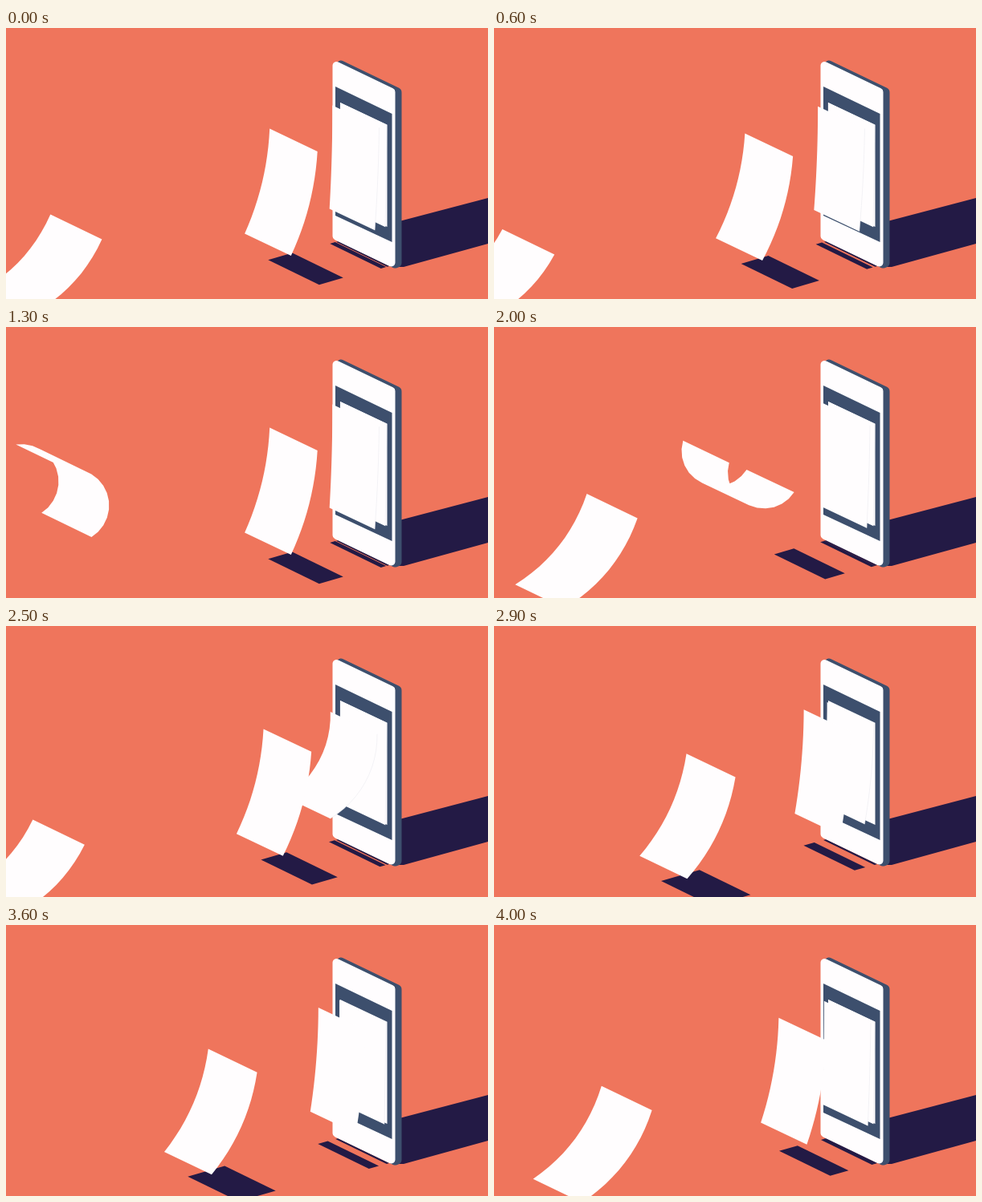
Write an HTML page with a canvas that moves like this. It is 600x338 px and loops after 4100 ms.

```html
<!DOCTYPE html>
<html lang="en">
<head>
<meta charset="utf-8">
<title>Sheets flying into a phone</title>
<style>
  html, body { margin: 0; width: 100%; height: 100%; overflow: hidden; background: #ef755c; }
  canvas { display: block; width: 600px; height: 338px; }
</style>
</head>
<body>
<canvas id="stage" width="600" height="338"></canvas>
<script>
const ctx = document.getElementById('stage').getContext('2d');
const LOOP = 4100, STEP = 100, SEGMENTS = 12;
const ORANGE = '#ef755c', NAVY = '#231a45', SLATE = '#3d4f6d', WHITE = '#fffdfe';

// One sheet tumbles: its top corner (relative to the flight path),
// the heading of its profile there and the total curl, in degrees.
const TUMBLER = 3, SHEET_LENGTH = 126;
const POSES = [
  { p: 0.7, x: 0, y: 0, heading: 90, curl: 0 },
  { p: 1.41, x: -1, y: 10, heading: 88, curl: 60 },
  { p: 2.21, x: -34, y: 60, heading: 122, curl: 165 },
  { p: 3.36, x: -43, y: -86, heading: -8, curl: 155 }
];

const clamp = (x, lo, hi) => Math.min(Math.max(x, lo), hi);
const steps = n => Array.from({ length: n }, (_, i) => i);

function polygon(points, color) {
  ctx.beginPath();
  points.forEach(p => ctx.lineTo(p[0], p[1]));
  ctx.closePath();
  ctx.fillStyle = color;
  ctx.fill();
}

function roundedPolygon(points, radius, color) {
  const n = points.length, first = points[0], last = points[n - 1];
  ctx.beginPath();
  ctx.moveTo((first[0] + last[0]) / 2, (first[1] + last[1]) / 2);
  points.forEach((p, i) => {
    const next = points[(i + 1) % n];
    ctx.arcTo(p[0], p[1], next[0], next[1], radius);
  });
  ctx.closePath();
  ctx.fillStyle = color;
  ctx.fill();
}

// Upright on the left and right, slanted along the top and bottom.
const panel = (left, right, topLeft, topRight, bottomLeft, bottomRight) =>
  [[left, topLeft], [right, topRight], [right, bottomRight], [left, bottomLeft]];

// Twenty ticks carry a sheet to the place of the one before it;
// the middle of the loop runs slightly fast.
function queuePosition(t) {
  const skipped = Math.round(4 * clamp((t - 600) / 1900, 0, 1));
  return 2.36 - (3 * t / STEP + skipped) / 20;
}

const distance = p => 2.83 * Math.pow(Math.max(p, 0), 4);
const anchor = d => [416 - d, 93 + 0.365 * d + 0.00006 * d * d];

// Left edge of a gently bent sheet, as a quadratic curve.
function bentProfile(d) {
  const hx = -(0.378 * d - 0.00027 * d * d);
  const hy = 128.5 + 0.06 * d - 0.00037 * d * d;
  const bend = 44 * d / (d + 215), len = Math.hypot(hx, hy);
  const cx = hx / 2 + bend * hy / len, cy = hy / 2 - bend * hx / len;
  return steps(SEGMENTS + 1).map(i => {
    const s = i / SEGMENTS, c = 2 * s * (1 - s);
    return [c * cx + s * s * hx, c * cy + s * s * hy];
  });
}

function poseAt(p) {
  const last = POSES.length - 1;
  const q = clamp(p, POSES[0].p, POSES[last].p);
  const i = Math.max(1, POSES.findIndex(pose => q <= pose.p));
  const a = POSES[i - 1], b = POSES[i], k = (q - a.p) / (b.p - a.p);
  const mix = key => a[key] + (b[key] - a[key]) * k;
  return { x: mix('x'), y: mix('y'), heading: mix('heading'), curl: mix('curl') };
}

// A strip of fixed length that turns evenly from top to bottom.
function curledProfile(p) {
  let { x, y, heading, curl } = poseAt(p);
  const points = [[x, y]];
  steps(SEGMENTS).forEach(i => {
    const angle = (heading + curl * (i + 0.5) / SEGMENTS) * Math.PI / 180;
    x += Math.cos(angle) * SHEET_LENGTH / SEGMENTS;
    y += Math.sin(angle) * SHEET_LENGTH / SEGMENTS;
    points.push([x, y]);
  });
  return points;
}

// Adds a quad to the path, always wound the same way so that folds never cancel.
function addQuad(a, b, c, d) {
  const turn = (b[0] - a[0]) * (d[1] - a[1]) - (b[1] - a[1]) * (d[0] - a[0]);
  const corners = turn < 0 ? [d, c, b, a] : [a, b, c, d];
  corners.forEach((q, i) => i ? ctx.lineTo(q[0], q[1]) : ctx.moveTo(q[0], q[1]));
  ctx.closePath();
}

function drawSheet(p, tumbles) {
  const d = distance(p), [x, y] = anchor(d);
  const wx = 58 + 0.017 * d, wy = 27.5 + 0.01 * d;
  const profile = tumbles ? curledProfile(p) : bentProfile(d);
  const left = profile.map(q => [q[0] + x, q[1] + y]);
  const right = left.map((q, i) => {
    const taper = 1 - 0.03 * i / SEGMENTS;
    return [q[0] + wx * taper, q[1] + wy * taper];
  });
  ctx.beginPath();
  for (let i = 1; i < left.length; i++) addQuad(left[i - 1], right[i - 1], right[i], left[i]);
  ctx.fillStyle = WHITE;
  ctx.fill();
  if (p < 1.6) {
    ctx.beginPath();
    right.forEach(q => ctx.lineTo(q[0], q[1]));
    ctx.lineWidth = 0.5;
    ctx.strokeStyle = '#e6e6ec';
    ctx.stroke();
  }
}

function drawShadow(p) {
  const d = distance(p);
  if (d > 420) return;
  const x = 411 - 0.78 * d - 0.0021 * d * d, y = 266.8 + 0.22 * d + 0.0004 * d * d;
  const ox = 3 + 0.36 * d - 0.0006 * d * d, oy = -0.29 * ox;
  polygon([[x, y], [x + ox, y + oy], [x + ox + 63.5, y + oy + 31], [x + 63.5, y + 31]], NAVY);
}

function drawPhone() {
  polygon([[486, 242], [600, 212], [600, 269], [495, 298], [484, 298]], NAVY);
  roundedPolygon([[411, 37], [492.5, 76.5], [492.5, 297], [484, 300], [411, 264]], 6, SLATE);
  roundedPolygon(panel(406.5, 484.5, 39, 76.5, 263, 300.5), 5, WHITE);
  polygon(panel(410, 480.5, 73, 107, 234, 267), SLATE);
  polygon(panel(416, 474.5, 93, 120.7, 221, 248), WHITE);
}

function draw(time) {
  const t = Math.floor((time % LOOP) / STEP) * STEP;
  const u = queuePosition(t), queue = [];
  for (let i = Math.ceil(-u); u + i < 4.2; i++) queue.push(i);

  ctx.fillStyle = ORANGE;
  ctx.fillRect(0, 0, 600, 338);
  queue.forEach(i => drawShadow(u + i));
  drawPhone();
  queue.forEach(i => drawSheet(u + i, i === TUMBLER));
}

let start = null;
function tick(now) {
  if (start === null) start = now;
  draw(now - start);
  requestAnimationFrame(tick);
}
draw(0);
requestAnimationFrame(tick);
</script>
</body>
</html>
```
